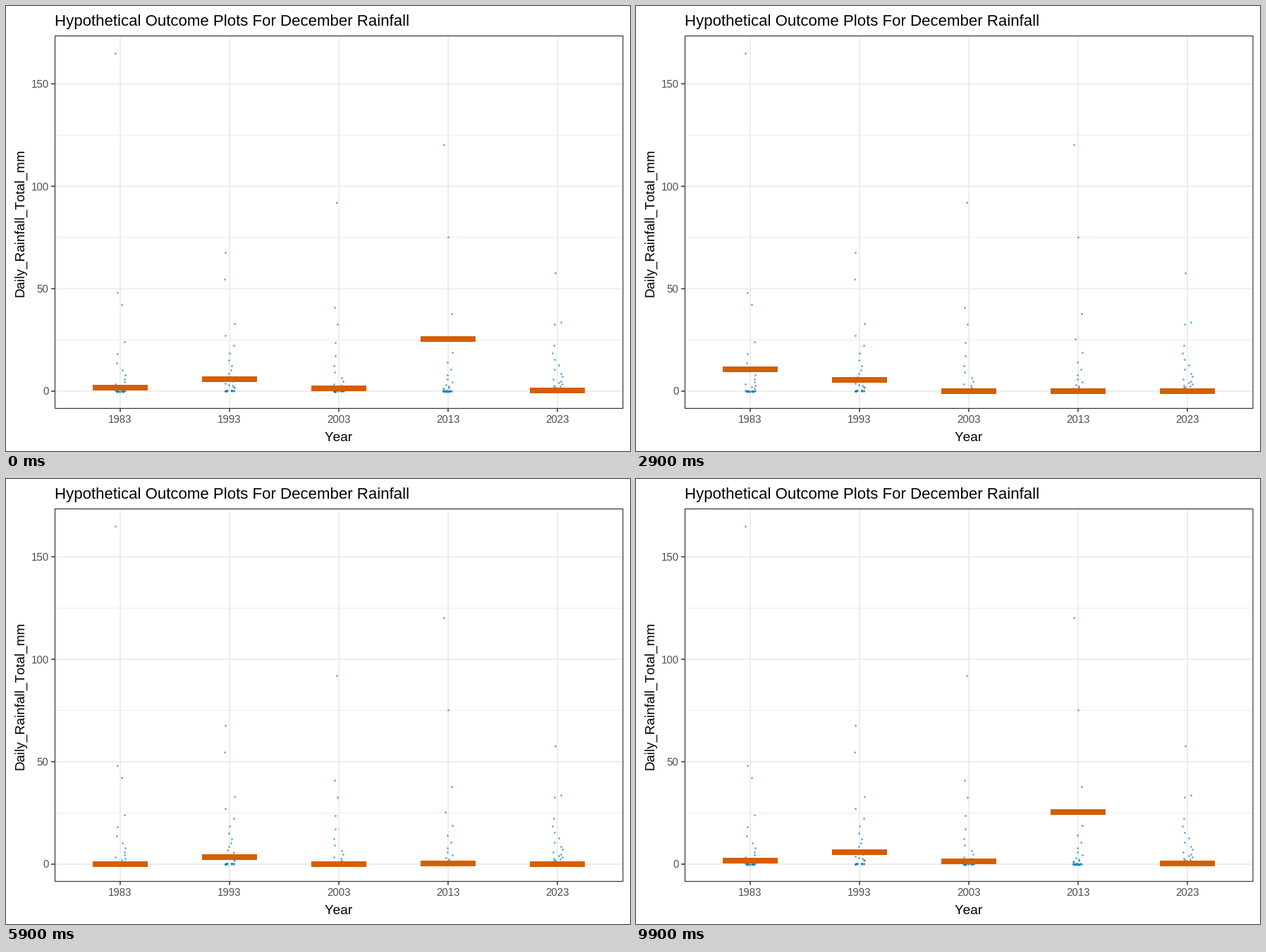
A matplotlib script that plays this animation: 885 by 632 pixels, repeating every 10000 ms.

```python
import matplotlib.pyplot as plt
import numpy as np
from matplotlib.animation import FuncAnimation
from matplotlib.patches import Rectangle

W, H, DPI = 885, 632, 100
PT = 72 / DPI  # points per pixel
LEFT, RIGHT, TOP, BOTTOM = 69.5, 875, 42.5, 571.5
ZERO, SCALE = 547, 2.91  # pixel row of 0 mm, pixels per mm
FIRST, STEP = 162, 155  # first year's column, column spacing
BAR_W, BAR_H = 78, 8
DAYS, OUTCOMES = 31, 20
GRID, INK = "#EBEBEB", "#333333"

plt.rcParams["font.family"] = "Liberation Sans"
plt.rcParams["text.kerning_factor"] = 6
plt.rcParams["text.hinting"] = "native"


class Year:
    """A December: a few storms, a geometric tail of wet days, the rest dry."""

    def __init__(self, storms, tail, sampled):
        self.storms = storms    # (pixel shift, mm)
        self.tail = tail        # wettest mm, driest mm, number of days
        self.sampled = sampled  # outcome: mm, for outcomes that hit a wet day

    def days(self, rng):
        shift, storm = np.transpose(self.storms)
        tail = np.geomspace(*self.tail)
        dry = rng.uniform(-0.25, 0.35, DAYS - len(storm) - len(tail))
        mm = np.concatenate([storm, tail, dry])
        spread = rng.uniform(-7.5, 7.5, DAYS - len(storm))
        return np.concatenate([shift, spread]), mm

    def draws(self):
        return [self.sampled.get(k, 0) for k in range(OUTCOMES)]


YEARS = {
    1983: Year([(-7, 165), (-4, 48), (2, 42.4)], (24, 1.5, 11),
               {0: 1.6, 2: 5, 6: 21, 9: 8.6, 16: 21, 18: 41.9}),
    1993: Year([(-6, 67.7), (-7, 54.8)], (33, 1.8, 16),
               {0: 5.9, 2: 2.2, 4: 31, 5: 5.6, 6: 5.6, 10: 30.6, 11: 8.3,
                12: 3.4, 17: 1.3}),
    2003: Year([(-3, 92), (-6, 40.8), (-2, 32.5)], (23.6, 1, 11),
               {0: 1.3, 2: 23.3, 3: 23.3, 15: 23.3, 17: 5.2, 19: 92}),
    2013: Year([(-6, 120.2), (0, 75.4), (5, 37.9), (-4, 25.4)], (18.9, 1, 11),
               {0: 25.5, 10: 37.9, 12: 0.5, 17: 1.3}),
    2023: Year([(-3, 57.8), (5, 33.6), (-4, 32.8)], (22.5, 1.3, 16),
               {0: 0.2, 2: 7.5, 8: 9.9, 10: 1.9, 14: 8}),
}
centers = FIRST + STEP * np.arange(len(YEARS))
draws = np.transpose([year.draws() for year in YEARS.values()])


def to_y(mm):
    return ZERO - SCALE * np.asarray(mm)


fig = plt.figure(figsize=(W / DPI, H / DPI), dpi=DPI, facecolor="white")
ax = fig.add_axes([0, 0, 1, 1])
ax.set_xlim(0, W)
ax.set_ylim(H, 0)
ax.axis("off")


def line(xs, ys, color, px):
    ax.plot(xs, ys, color=color, lw=px * PT, solid_capstyle="butt",
            snap=False, zorder=1)


def label(x, y, text, px, color="black", **kw):
    ax.text(x, y, text, size=px * PT, color=color, va="baseline", **kw)


# grid, ticks and tick labels
for mm in range(25, 151, 50):
    line([LEFT, RIGHT], [to_y(mm)] * 2, GRID, 0.9)
for mm in range(0, 151, 50):
    y = to_y(mm)
    line([LEFT, RIGHT], [y, y], GRID, 1.7)
    line([LEFT - 5.5, LEFT], [y, y], INK, 1.5)
    label(60.5, y + 5.5, str(mm), 15, "#4D4D4D", ha="right")
for x, year in zip(centers, YEARS):
    line([x, x], [TOP, BOTTOM], GRID, 1.7)
    line([x, x], [BOTTOM, BOTTOM + 5], INK, 1.5)
    label(x, 592.5, str(year), 15, "#4D4D4D", ha="center")

ax.add_patch(Rectangle((LEFT, TOP), RIGHT - LEFT, BOTTOM - TOP, fill=False,
                       ec=INK, lw=1.2 * PT, snap=False, zorder=5))

label(69, 28, "Hypothetical Outcome Plots For December Rainfall", 22.33)
label(472, 618, "Year", 19, ha="center")
label(25, 307.5, "Daily_Rainfall_Total_mm", 18.9, ha="center",
      rotation=90, rotation_mode="anchor")

rng = np.random.default_rng(12)
for x, year in zip(centers, YEARS.values()):
    shift, mm = year.days(rng)
    ax.scatter(x + shift, to_y(mm), s=(2.8 * PT) ** 2, color="#0072B2",
               alpha=0.6, linewidths=0, zorder=3)

bars = [ax.add_patch(Rectangle((x - BAR_W / 2, 0), BAR_W, BAR_H, lw=0,
                               color="#D55E00", snap=False, zorder=4))
        for x in centers]


def update(frame):
    # a five-frame cycle with one halfway frame; the second half runs one early
    k, phase = divmod(frame + (1 if frame < 50 else 2), 5)
    draw = draws[k % OUTCOMES]
    if phase == 0:
        draw = (draw + draws[k - 1]) / 2
    for bar, y in zip(bars, to_y(draw)):
        bar.set_y(round(y) - BAR_H / 2)
    return bars


anim = FuncAnimation(fig, update, frames=100, interval=100, repeat=True,
                     repeat_delay=0, blit=False)
plt.show()
```
